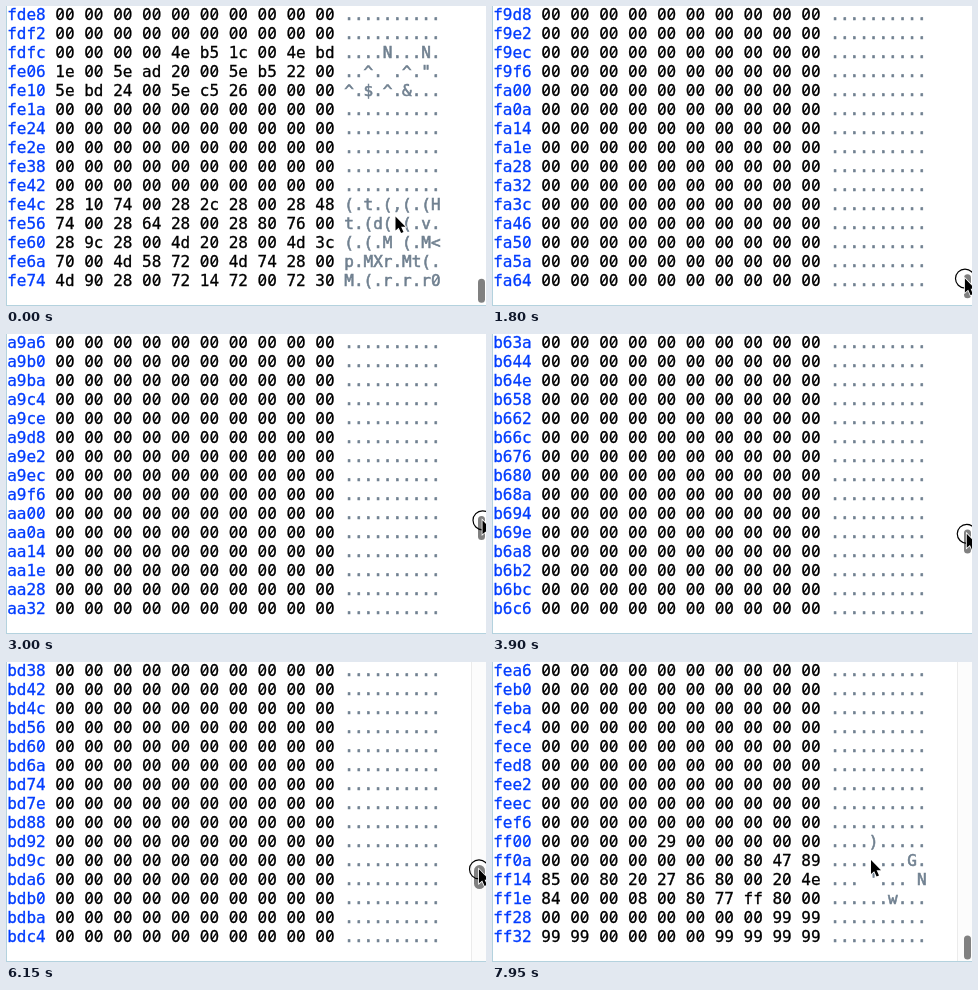
These frames come from a looping animation (480x300 px, 8 s). An HTML page with a canvas:

```html
<!DOCTYPE html>
<html>
<head>
<meta charset="utf-8">
<title>Hex viewer</title>
<style>
html, body { margin: 0; width: 100%; height: 100%; overflow: hidden; background: #fff; }
canvas { display: block; }
</style>
</head>
<body>
<canvas id="view" width="480" height="300"></canvas>
<script>
const ctx = document.getElementById('view').getContext('2d');
const LOOP = 8000, STEP = 150;
const ROWS = 15, COLS = 10, ROW_H = 19, CHAR_W = 9.63;

const memory = new Uint8Array(65536);

// A run of records: a 16-bit word growing by step, a tag byte and a zero.
function records(addr, word, step, tags) {
  [...tags].forEach((tag, i) => {
    const w = word + i * step;
    memory.set([w >> 8, w & 255, tag.charCodeAt(0), 0], addr + i * 4);
  });
}
function poke(addr, hex) {
  memory.set(hex.split(' ').map(b => parseInt(b, 16)), addr);
}
records(0xfe00, 0x4eb5, 8, '\x1c\x1e');
records(0xfe08, 0x5ead, 8, ' "$&');
records(0xfe4c, 0x2810, 28, 't(t(v(');
records(0xfe64, 0x4d20, 28, '(pr((');
records(0xfe78, 0x7214, 28, 'rr');
poke(0xff04, '29');
poke(0xff11, '80 47 89 85 00 80 20 27 86 80 00 20 4e 84 00 00 08 00 80 77 ff 80');
memory.fill(0x99, 0xff30, 0xff34);
memory.fill(0x99, 0xff38, 0xff3c);
poke(0xff96, '0b');
poke(0xffa9, '07 70');
poke(0xffbe, '00 1a 3e c0 e0 46 3e 28 3d 20 fd c9');
poke(0xffd2, '03 00 00 00 00 10 7f');

// Moves: [begin, end, value reached]; the value rests in between.
const scroll = [
  [0, 450, 0xff0a], [600, 750, 0xff50], [1500, 1800, 0xf9d8], [1800, 2400, 0xb5e0],
  [2550, 3000, 0xa9a6], [3150, 4650, 0xc2ce], [4800, 5400, 0xbf80],
  [5700, 6150, 0xbd38], [6300, 6900, 0xff46], [7200, 7950, 0xfea6]
];
const pointX = [
  [0, 450, 394], [600, 750, 438.5], [750, 1350, 473], [1800, 3000, 476.5],
  [3150, 4650, 473], [6750, 7050, 452], [7200, 7950, 379]
];
const pointY = [[0, 450, 214], [600, 750, 256], [750, 1350, 277], [6750, 7050, 283], [7200, 7950, 198]];
const DRAG_START = 1650, DRAG_END = 6750;

function follow(moves, value, t) {
  for (const [begin, end, goal] of moves) {
    if (t <= begin) break;
    value += (goal - value) * Math.min(1, (t - begin) / (end - begin));
  }
  return value;
}

// The zero gets a slash in place of the font's dot.
function slashZero(x, y) {
  const ink = ctx.fillStyle;
  ctx.fillStyle = '#fff';
  ctx.beginPath();
  ctx.ellipse(x + 4.8, y - 5.8, 1.8, 3.4, 0, 0, 7);
  ctx.fill();
  ctx.fillStyle = ink;
  ctx.lineWidth = 1.3;
  ctx.beginPath();
  ctx.moveTo(x + 2.8, y - 3);
  ctx.lineTo(x + 6.8, y - 8.6);
  ctx.stroke();
}

function write(text, col, y, color, weight) {
  ctx.fillStyle = ctx.strokeStyle = color;
  [...text].forEach((ch, i) => {
    const x = 1.2 + (col + i) * CHAR_W;
    ctx.lineWidth = weight;
    ctx.fillText(ch, x, y);
    ctx.strokeText(ch, x, y);
    if (ch === '0') slashZero(x, y);
  });
}

const hex = (n, len) => n.toString(16).padStart(len, '0');
const printable = b => b >= 32 && b < 127 ? String.fromCharCode(b) : '.';

function drawRow(addr, y) {
  const bytes = [...memory.subarray(addr, addr + COLS)];
  write(hex(addr, 4), 0, y, '#003cff', 0.3);
  write(bytes.map(b => hex(b, 2)).join(' '), 5, y, '#000', 0.3);
  write(bytes.map(printable).join(''), 35, y, '#708090', 0.6);
}

function drawBar(y, t) {
  if (t >= 5850) {
    ctx.fillStyle = '#fcfcfc';
    ctx.fillRect(465, 0, 15, 299);
    ctx.fillStyle = '#ebebeb';
    ctx.fillRect(465, 0, 1, 299);
  }
  const wide = t >= 5850 && t < 7050;
  const x = wide ? 468 : 472, w = wide ? 11 : 7;
  ctx.fillStyle = '#808080';
  ctx.beginPath();
  ctx.roundRect(x, y, w, 24, w / 2);
  ctx.fill();
}

function drawPointer(x, y, pressed) {
  if (pressed) {
    ctx.strokeStyle = '#000';
    ctx.lineWidth = 1.2;
    ctx.beginPath();
    ctx.arc(x, y, 9.5, 0, 7);
    ctx.stroke();
  }
  ctx.save();
  ctx.translate(x, y);
  const arrow = new Path2D('M0 0V14L3.2 11.2L5.6 16.6L8 15.6L5.6 10.3H10Z');
  ctx.strokeStyle = '#fff';
  ctx.lineWidth = 1.6;
  ctx.stroke(arrow);
  ctx.fillStyle = '#000';
  ctx.fill(arrow);
  ctx.restore();
}

function draw(t) {
  const top = Math.round(follow(scroll, 0xfde8, t) / COLS) * COLS;
  const thumb = Math.min(273.4, 182 + (top - 0xa9a6) / 238);
  const drag = t >= DRAG_START && t < DRAG_END;

  ctx.fillStyle = '#fff';
  ctx.fillRect(0, 0, 480, 300);
  ctx.font = '16px "DejaVu Sans Mono", monospace';
  for (let r = 0; r < ROWS; r++) drawRow(top + r * COLS, 14 + r * ROW_H);

  drawBar(thumb, t);
  ctx.fillStyle = '#b4d2de';
  ctx.fillRect(0, 0, 1, 300);
  ctx.fillRect(0, 299, 480, 1);

  const y = drag ? thumb + 4.3 : follow(pointY, 210.5, t);
  drawPointer(follow(pointX, 389.5, t), y, drag);
}

const start = performance.now();
let last = -1;
function tick() {
  const t = (performance.now() - start) % LOOP;
  const step = Math.floor(t / STEP) * STEP;
  if (step !== last) draw(last = step);
  requestAnimationFrame(tick);
}
tick();
</script>
</body>
</html>
```
